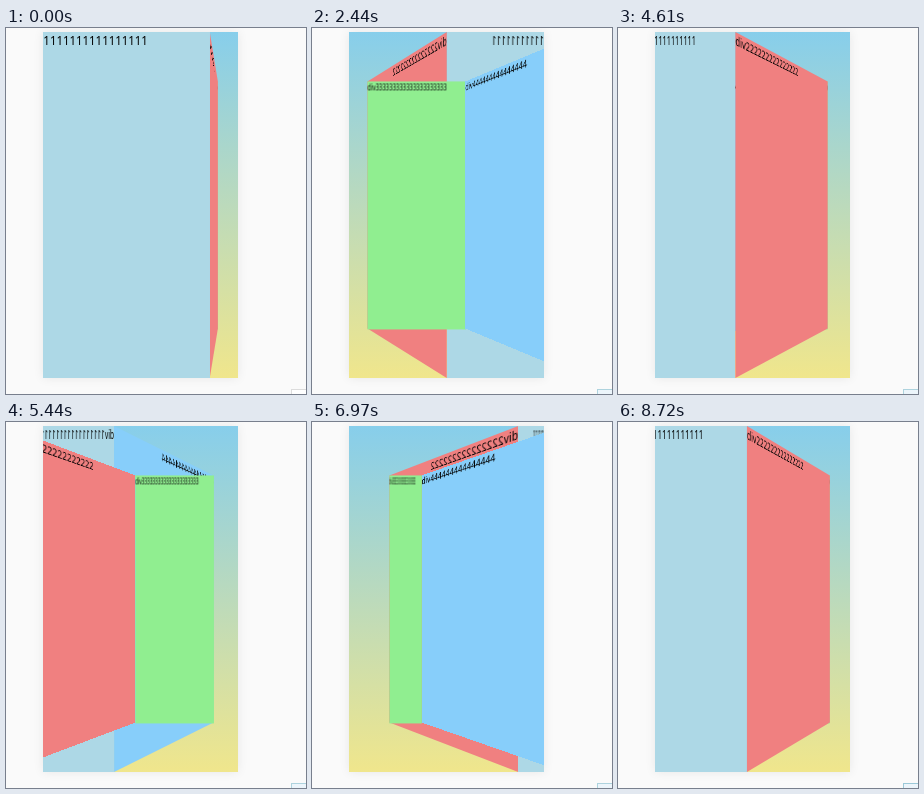
An HTML page for the animation above (8790 ms loop, 300 by 366 pixels).

```html
<!DOCTYPE html>
<html lang="en">
<head>
<meta charset="utf-8">
<title>Rotating box</title>
<style>
  html, body { margin: 0; width: 100%; height: 100%; overflow: hidden; background: #fafafa; }
  #box, #shade { position: absolute; left: 37px; top: 4px; width: 195px; height: 346px; }
  #box { overflow: clip; background: linear-gradient(skyblue, khaki); }
  #shade { box-shadow: 0 0 10px rgba(0, 0, 0, .08); }
  .face {
    position: absolute; left: 97px; top: 173px; width: 195px; height: 346px;
    transform-origin: 0 0;
    font: 11.8px "Noto Sans", "Open Sans", sans-serif;
    color: #000; white-space: nowrap;
  }
  #button {
    position: absolute; left: 285px; top: 361px; right: 0; bottom: 0;
    border: solid; border-width: 1px 0 0 1px;
  }
</style>
</head>
<body>
<div id="shade"></div>
<div id="box"></div>
<div id="button"></div>
<script>
const LOOP = 8790, STEPS = 126, STEP = LOOP / STEPS;
const WIDTH = 195, HALF = WIDTH / 2, HEIGHT = 346;
const DEPTH = 155.7, SHRINK = 0.4;

// Each face runs from corner a to corner b; a corner is [x, depth].
const faces = [
  { text: 'div' + '1'.repeat(17), color: 'lightblue', a: [-HALF, 0], b: [HALF, 0] },
  { text: 'div' + '2'.repeat(15), color: 'lightcoral', a: [HALF, 0], b: [HALF, 1] },
  { text: 'div' + '3'.repeat(21), color: 'lightgreen', a: [HALF, 1], b: [-HALF, 1] },
  { text: 'div' + '4'.repeat(15), color: 'lightskyblue', a: [-HALF, 1], b: [-HALF, 0] }
];
const box = document.getElementById('box');
const button = document.getElementById('button');

for (const face of faces) {
  const el = face.el = document.createElement('div');
  el.className = 'face';
  el.textContent = face.text;
  el.style.background = face.color;
  box.append(el);
}

function draw(time) {
  const t = time % LOOP;
  const step = Math.min(STEPS - 1, Math.floor((t + 9) / STEP));
  const angle = (14.6 + step * 6.02) * Math.PI / 180;
  const cos = Math.cos(angle), sin = Math.sin(angle);
  const place = ([x, d]) => [x * cos + (DEPTH * d - HALF) * sin, 1 + SHRINK * d];

  faces.forEach(({ el, a, b }, i) => {
    const [x0, w0] = place(a), [x1, w1] = place(b);
    const m = [
      (x1 - x0) / WIDTH, 0, 0, (w1 - w0) / WIDTH,
      0, 1, 0, 0,
      0, 0, 1, 0,
      x0, -HEIGHT / 2, 0, w0
    ];
    el.style.transform = `matrix3d(${m.map(v => v.toFixed(7))})`;
    el.style.zIndex = Math.round(1000 + 900 * Math.cos(angle - i * Math.PI / 2));
  });

  const hover = t > 450;
  button.style.background = hover ? '#ecf5fb' : '#fff';
  button.style.borderColor = t > 8220 ? '#9cc9d8' : hover ? '#aed3de' : '#dcdcdc';
}

const start = performance.now();
function tick() {
  draw(performance.now() - start);
  requestAnimationFrame(tick);
}
tick();
</script>
</body>
</html>
```
